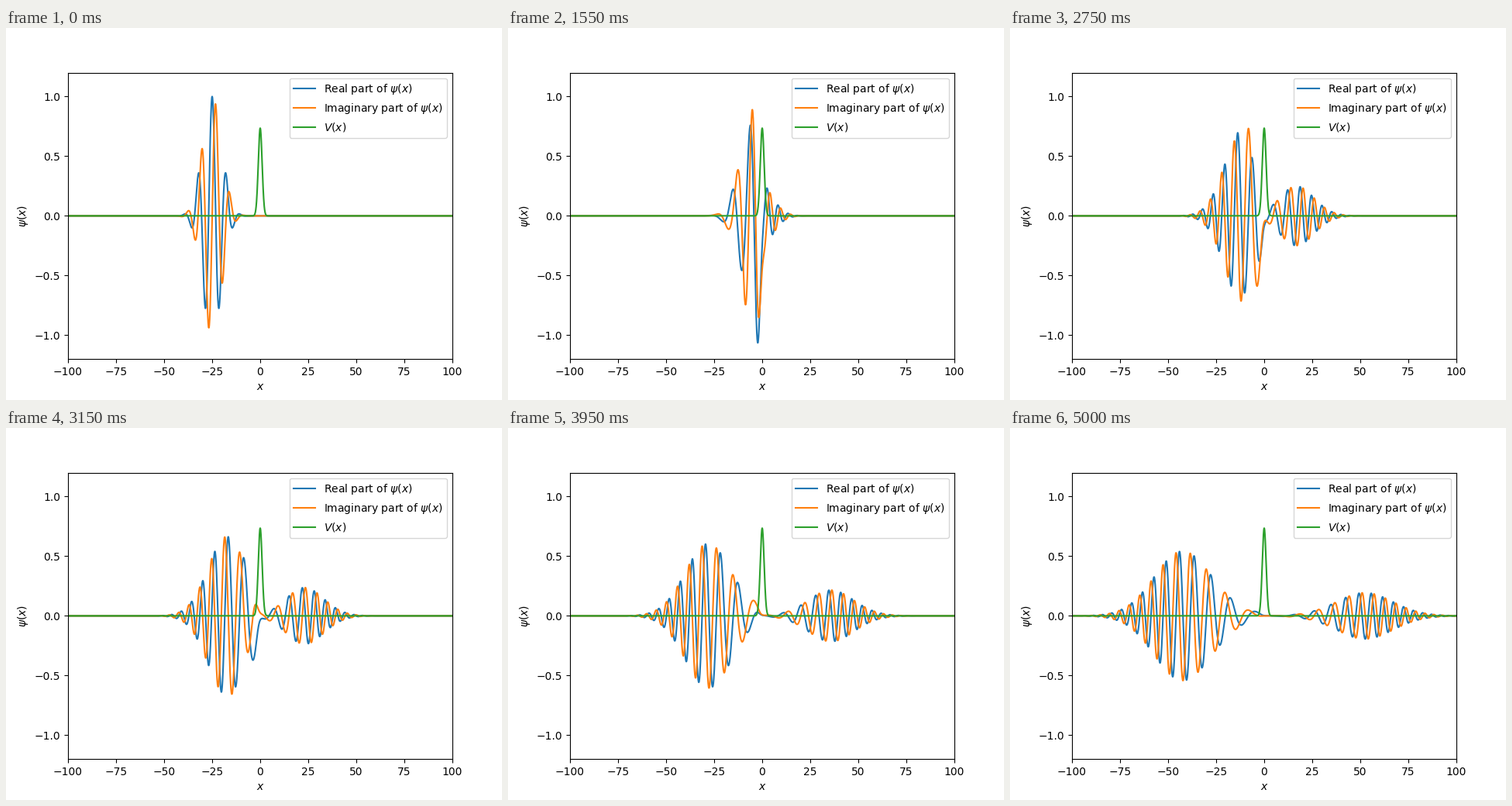
Recreate the animation shown at these times as a matplotlib script. Size 640x480 px, loop 5.05 s.

```python
import numpy as np
import matplotlib.pyplot as plt
from matplotlib.animation import FuncAnimation

# Atomic units: Hartree, Bohr radius, hbar = m = 1
EV = 1 / 27.211386
FRAMES = 101
SUBSTEPS = 20

energy, height = 10 * EV, 20 * EV
x0, sigma = -25.0, 5.0
k0 = np.sqrt(2 * energy)
dt = 0.8 / SUBSTEPS

# The grid is wider than the view so nothing wraps around
n, dx = 4096, 0.1
x = (np.arange(n) - n // 2) * dx
k = 2 * np.pi * np.fft.fftfreq(n, dx)
V = height * np.exp(-x**2 / 2)


def evolve():
    """Split-step solution of the Schroedinger equation, one state per frame."""
    psi = np.exp(-(x - x0)**2 / (2 * sigma**2) + 1j * k0 * (x - x0))
    half_kick = np.exp(-0.5j * V * dt)
    drift = np.exp(-0.5j * k**2 * dt)
    states = [psi]
    for _ in range(FRAMES - 1):
        for _ in range(SUBSTEPS):
            psi = half_kick * np.fft.ifft(drift * np.fft.fft(half_kick * psi))
        states.append(psi)
    return states


states = evolve()
view = np.abs(x) <= 100.01

fig, ax = plt.subplots(figsize=(6.4, 4.8), dpi=100)
real, = ax.plot(x[view], states[0].real[view], label=r"Real part of $\psi(x)$")
imag, = ax.plot(x[view], states[0].imag[view], label=r"Imaginary part of $\psi(x)$")
ax.plot(x[view], V[view], label=r"$V(x)$")
ax.set_xlim(-100, 100)
ax.set_ylim(-1.2, 1.2)
ax.set_xlabel(r"$x$")
ax.set_ylabel(r"$\psi(x)$")
ax.legend(loc="upper right")


def update(i):
    real.set_ydata(states[i].real[view])
    imag.set_ydata(states[i].imag[view])
    return real, imag


anim = FuncAnimation(fig, update, frames=FRAMES, interval=50, repeat=True)
plt.show()
```
